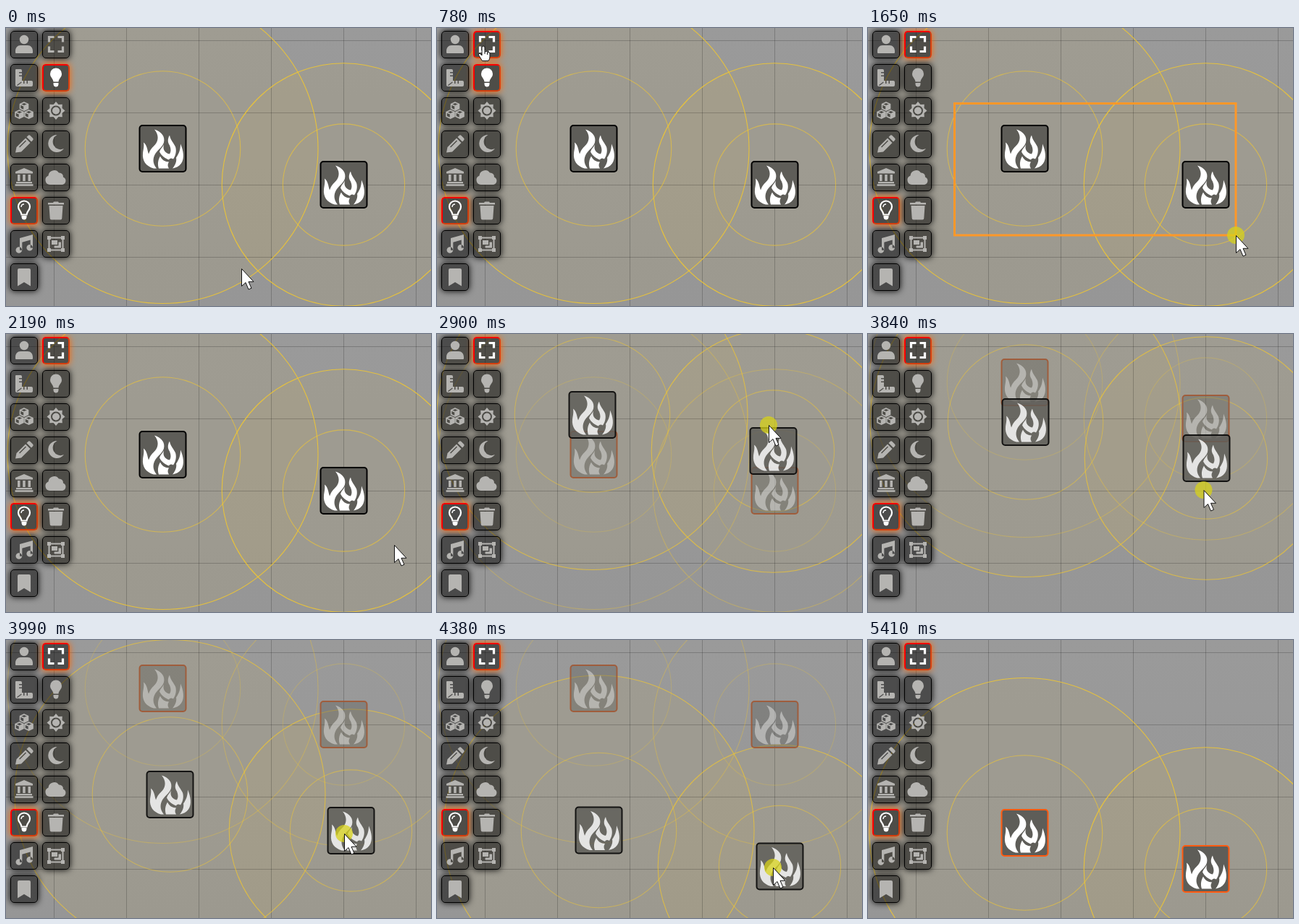
Animation, 587 px wide and 385 px high, one loop 6020 ms. Source, as an HTML page with a canvas:

```html
<!DOCTYPE html>
<html lang="en">
<head>
<meta charset="utf-8">
<title>Moving lights as a group</title>
<style>
  html, body { margin: 0; width: 100%; height: 100%; overflow: hidden; background: #989898; }
  #stage { position: relative; width: 587px; height: 385px; overflow: hidden; }
  canvas, #pointer { position: absolute; left: 0; top: 0; }
  .tool {
    position: absolute; box-sizing: border-box; width: 38px; height: 38px;
    border: 1px solid #000; border-radius: 5px;
    background: rgba(0, 0, 0, .5); box-shadow: 0 0 10px #000; color: #b5b4b1;
  }
  .tool svg { position: absolute; left: -1px; top: -1px; }
  .tool.on {
    color: #fff; border: 2px solid; border-color: #f00 #d8400f #d8400f #f00;
    box-shadow: 0 0 10px #ff6400;
  }
  .tool.on svg { left: -2px; top: -2px; }
</style>
</head>
<body>
<div id="stage">
  <canvas id="scene" width="587" height="385"></canvas>
  <div id="tools"></div>
  <svg id="pointer" width="587" height="385">
    <g id="tip">
      <circle id="press" r="12" fill="#d8d318" fill-opacity=".74"/>
      <path id="arrow" d="M.5.5V24.500L6 19.500L10 29L14 27.300L10 18.300H17Z" fill="#fff" stroke="#111" stroke-linejoin="round"/>
      <path id="hand" d="M-2 2Q-2 0 0 0T2 2V8Q5 6.500 6 8.500Q8.500 7.500 9 10V15Q9 18 7 20.500H-1.500L-6.500 12.500Q-7 9.500-4.500 10.500L-2 13ZM2 8V11M5.500 9V12" fill="#fff" stroke="#111" stroke-linejoin="round"/>
    </g>
  </svg>
</div>
<script>
const LOOP = 6020, TICK = 78.2;
const $ = id => document.getElementById(id);
const ctx = $('scene').getContext('2d');

// Toolbar icons, drawn in a 38 x 38 box
const line = (d, w) => `<path d="${d}" fill="none" stroke="currentColor" stroke-width="${w}"/>`;
const solid = d => `<path d="${d}" fill-rule="evenodd"/>`;
const cube = (x, y) =>
  line(`M${x} ${y - 5.5}l5.500 2.500v6l-5.500 2.500l-5.500-2.500v-6zM${x - 5.5} ${y - 3}l5.500 2.500l5.500-2.500M${x} ${y - .5}v6`, 1.6) +
  solid(`M${x} ${y}l5.500-3v6l-5.500 2.500z`);
const star = Array.from({ length: 16 }, (_, i) => {
  const a = i * Math.PI / 8, r = i % 2 ? 9.2 : 12.5;
  return (19 + r * Math.cos(a)).toFixed(1) + ' ' + (18.5 + r * Math.sin(a)).toFixed(1);
}).join('L');
const disc = (x, y, r) => `M${x - r} ${y}a${r} ${r} 0 1 0 ${2 * r} 0a${r} ${r} 0 1 0 ${-2 * r} 0z`;
const box = (x, y, w, h) => `M${x} ${y}h${w}v${h}h${-w}z`;
const glass = 'M19 5.500a8 8 0 0 1 8 8c0 5-4 6-4.500 11h-7c-.5-5-4.500-6-4.500-11a8 8 0 0 1 8-8z';
const base = 'M15.500 26h7v2q-.5 3.500-3.500 3.500t-3.500-3.500z';

const icons = {
  left: [
    solid(disc(19, 12, 6.2) + 'M7 30v-2c0-5 3-8 7-8h10c4 0 7 3 7 8v2q0 1-1 1H8q-1 0-1-1z'),
    solid('M8 7h6q2 0 2 2v2h-4v1.500h4v3h-4v1.500h4v6h2v4h1.500v-4h3v4h1.500v-4h5q2 0 2 2v4q0 2-2 2H9q-2 0-2-2V8q0-1 1-1zM9 29l6-4.500l.7.900l-6 4.500z'),
    cube(19, 12.5) + cube(12.5, 23.5) + cube(25.5, 23.5),
    solid('M7 30.500l1.500-7.500L21 10.500l6.500 6.500L15 29.500zM22.500 9l2-2q1.500-1.500 3 0l3.500 3.500q1.500 1.500 0 3l-2 2zM12 22.500l9-9l1 1l-9 9z'),
    solid('M19 6l12 5v2.500H7v-2.500z' + box(10, 15, 3.5, 9) + box(17.2, 15, 3.5, 9) + box(24.5, 15, 3.5, 9) + box(8, 25, 22, 2.2) + box(6.5, 28.2, 25, 2.6)),
    line(glass, 2.2) + solid(base) + line('M15 14q0-4 4-4', 1.5),
    solid('M13 11l18-5v18.500h-3.300V13.500l-11.400 3.200v11h-3.300z' + disc(11.8, 27.5, 4.3) + disc(26.7, 24.3, 4.3)),
    solid('M10 9q0-2 2-2h14q2 0 2 2v22.500l-9-5.500l-9 5.500z')
  ],
  right: [
    line('M9.500 15.500V8.500H16.500M21.500 8.500h7v7M28.500 21.500v7h-7M16.500 28.500h-7v-7', 3.2),
    solid(glass + base),
    solid('M' + star + 'z' + disc(19, 18.5, 7) + disc(19, 18.5, 5)),
    solid('M20.500 6A12 12 0 1 0 30 25A10.500 10.500 0 0 1 20.500 6z'),
    solid('M10.500 29a6.500 6.500 0 0 1-2-12.500a8 8 0 0 1 14.500-4a5.500 5.500 0 0 1 6 6a5.500 5.500 0 0 1-1 10.500z'),
    solid('M8 8h7l1-1.500h6l1 1.500h7v2.500H8zM9.500 12h19l-1.200 17.500q0 2-2 2H12.700q-2 0-2-2z'),
    line(box(9.5, 10.5, 19, 17), 2) + solid(box(7, 8, 5, 5) + box(26, 8, 5, 5) + box(7, 25, 5, 5) + box(26, 25, 5, 5) + box(13, 14, 8, 6) + 'M22.500 16.500h3.500v8h-9.500v-3h6z')
  ]
};

function addTools(list, x) {
  return list.map((icon, i) => {
    const el = document.createElement('div');
    el.className = 'tool';
    el.style.left = x + 'px';
    el.style.top = 4 + 46 * i + 'px';
    el.innerHTML = `<svg width="38" height="38" fill="currentColor">${icon}</svg>`;
    $('tools').append(el);
    return el;
  });
}
const left = addTools(icons.left, 6);
const [selectTool, lightTool] = addTools(icons.right, 50);
left[5].classList.add('on');

// Pointer path: tick, x, y
const path = [
  [0, 325, 333], [1, 318, 322], [3, 230, 200], [5, 115, 70], [6, 80, 35], [8, 64, 25],
  [12, 64, 25], [13, 68, 32], [15, 112, 92], [16, 120, 104], [17, 165, 125], [19, 440, 255],
  [20, 503, 285], [21, 508, 287], [23, 511, 288], [25, 541, 295], [28, 536, 292],
  [29, 528, 280], [31, 470, 228], [32, 461, 217], [33, 461, 217], [34, 461, 214],
  [36, 459, 162], [37, 458, 126], [38, 458, 117], [39, 458, 115], [45, 458, 115],
  [46, 458, 118], [48, 459, 170], [50, 468, 262], [51, 467, 268], [53, 467, 300],
  [54, 466, 308], [56, 464, 315], [61, 484, 341], [68, 540, 380], [69, 541, 392]
];

function pointerAt(k) {
  const i = path.findIndex(p => p[0] > k);
  if (i < 0) return path[path.length - 1].slice(1);
  const a = path[i - 1], b = path[i], f = (k - a[0]) / (b[0] - a[0]);
  return [a[1] + (b[1] - a[1]) * f, a[2] + (b[2] - a[2]) * f];
}

const within = (k, a, b) => k >= a && k < b;
const DRAGS = [[34, 40], [46, 57]];
const LIGHTS = [{ x: 216.5, y: 167, r: 214.5 }, { x: 466.5, y: 217, r: 168.3 }];
const EDGE = { plain: '#000', hot: '#ff5a10', ghost: '#a3552f' };
const flame = new Path2D(
  'M20 60C9 57 4 49 5 39C5.500 34 7 30 6 24C11 28 11 34 13 40C15 34 18 31 22 27C27 21 27 13 21 6' +
  'C31 9 36 16 34 24C32 31 24 35 21 42C18 49 20 55 24 60Z' +
  'M34 27C32 34 36 39 42 40C44 37 44 33 42 28C39 24 39 19 42 14C43 21 48 25 50 30C52 36 50 43 47 47' +
  'C44 45 42 46 41 48C36 46 31 43 28 37C29 33 32 31 34 27Z' +
  'M57 26C61 35 63 46 58 53C55 57 51 59 46 60C50 55 52 50 51 45C54 41 57 35 57 26Z' +
  'M27 60C25 54 26 48 29 43C31 48 36 51 41 51C39 54 39 57 41 60Z');

function drawMap() {
  const g = ctx.createLinearGradient(0, 0, 0, 385);
  g.addColorStop(0, '#9a9a9a');
  g.addColorStop(1, '#969696');
  ctx.fillStyle = g;
  ctx.fillRect(0, 0, 587, 385);
}

function drawGrid() {
  ctx.fillStyle = 'rgba(0,0,0,.2)';
  for (let x = 66; x < 587; x += 100) ctx.fillRect(x, 0, 1, 385);
  for (let y = 17; y < 385; y += 100) ctx.fillRect(0, y, 587, 1);
}

function disk(x, y, r) {
  ctx.beginPath();
  ctx.arc(x, y, r, 0, 2 * Math.PI);
}

function drawGlow({ x, y, r, edge }) {
  if (edge === EDGE.ghost) return;
  ctx.fillStyle = 'rgba(190,168,100,.14)';
  disk(x, y, r);
  ctx.fill();
}

function drawRings({ x, y, r, alpha }) {
  ctx.globalAlpha = alpha;
  ctx.lineWidth = 1.1;
  for (const [size, a] of [[r, .85], [r / 2, .6]]) {
    ctx.strokeStyle = `rgba(243,200,48,${a})`;
    disk(x, y, size);
    ctx.stroke();
  }
}

function drawToken({ x, y, alpha, edge }) {
  ctx.save();
  ctx.translate(x - 32.5, y - 32.5);
  ctx.globalAlpha = alpha;
  ctx.beginPath();
  ctx.roundRect(.5, .5, 64, 64, 4);
  ctx.fillStyle = '#5e5d58';
  ctx.fill();
  ctx.fillStyle = '#fff';
  ctx.fill(flame);
  ctx.globalAlpha = Math.max(alpha, .85);
  ctx.lineWidth = 2;
  ctx.strokeStyle = edge;
  ctx.stroke();
  ctx.restore();
}

function sprites(k) {
  const dy = k < 40 ? 0 : k < 57 ? -100 : 100;
  const drag = DRAGS.find(([a, b]) => within(k, a, b));
  const place = (ox, oy, alpha, edge) =>
    LIGHTS.map((l, i) => ({ x: l.x + ox, y: l.y + oy, r: l.r, alpha, edge: edge(i) }));
  if (!drag) return place(0, dy, 1, i => k >= 57 || (k >= 43 && i === 1) ? EDGE.hot : EDGE.plain);
  // The dragged copies trail the pointer by one tick
  const from = pointerAt(drag[0] - 1), to = pointerAt(k - 1);
  return [
    ...place(0, dy, .4, () => EDGE.ghost),
    ...place(to[0] - from[0], dy + to[1] - from[1], .82, () => EDGE.plain)
  ];
}

function drawMarquee(x, y) {
  ctx.globalAlpha = 1;
  ctx.lineWidth = 3;
  ctx.strokeStyle = '#ff9829';
  ctx.strokeRect(119.5, 104.5, x - 119.5, y - 104.5);
}

function render(ms) {
  const k = Math.floor((ms % LOOP + 6) / TICK);
  const [x, y] = pointerAt(k);
  const list = sprites(k);

  ctx.globalAlpha = 1;
  drawMap();
  list.forEach(drawGlow);
  drawGrid();
  list.forEach(drawRings);
  list.forEach(drawToken);
  if (within(k, 17, 23)) drawMarquee(x, y);

  selectTool.classList.toggle('on', k >= 6);
  lightTool.classList.toggle('on', k < 11);

  const overTool = x < 88 && y < 42;
  const pressed = k === 9 || within(k, 16, 23) || DRAGS.some(([a, b]) => within(k, a, b));
  $('tip').setAttribute('transform', `translate(${x} ${y})`);
  $('hand').style.display = overTool ? '' : 'none';
  $('arrow').style.display = overTool ? 'none' : '';
  $('press').style.display = pressed ? '' : 'none';
}

const start = performance.now();
function loop() {
  render(performance.now() - start);
  requestAnimationFrame(loop);
}
loop();
</script>
</body>
</html>
```
